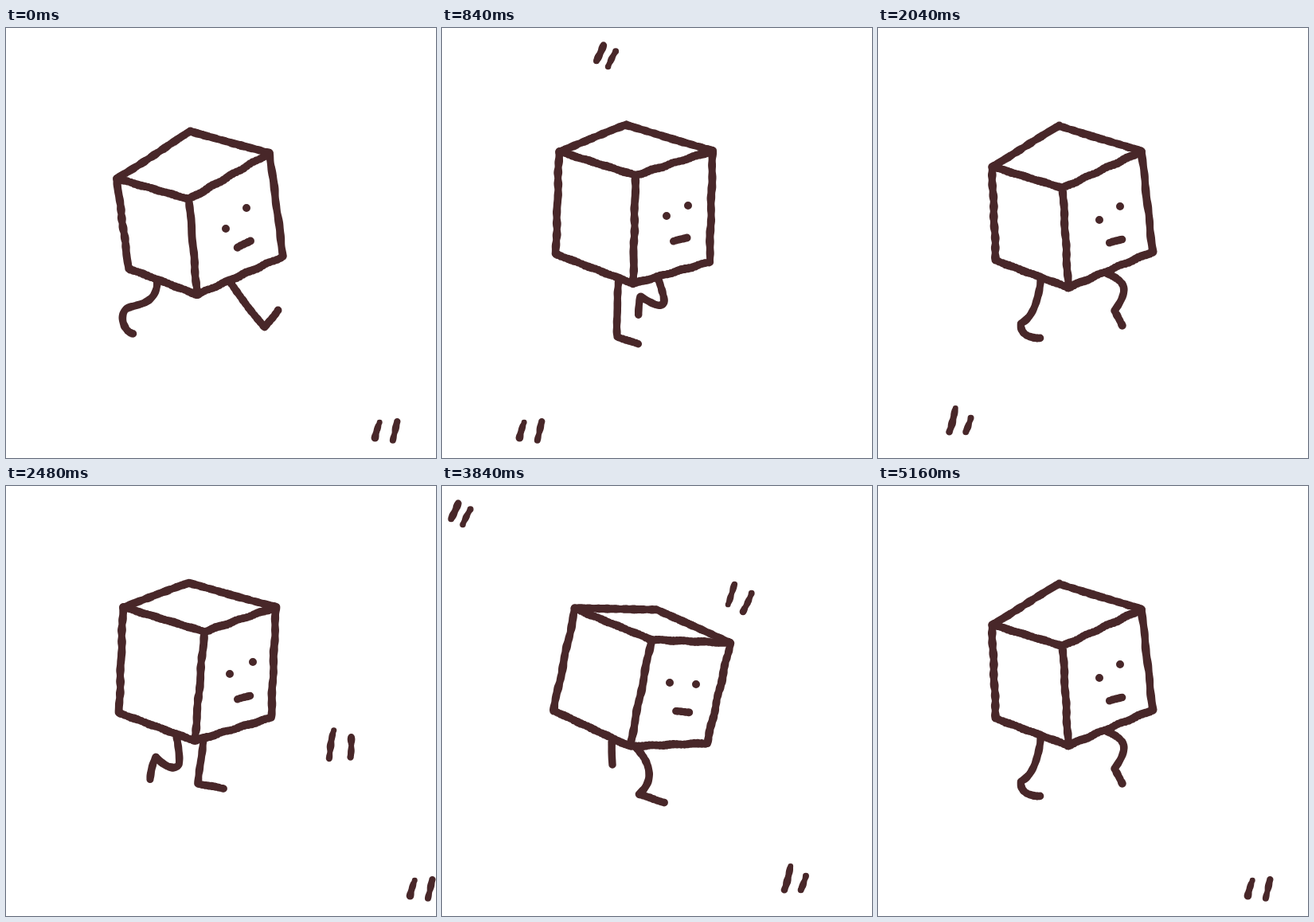
Write an HTML page with a canvas that moves like this. It is 540x540 px and loops after 5.2 s.

```html
<!DOCTYPE html>
<html lang="en">
<head>
<meta charset="utf-8">
<title>Walking cube</title>
<style>
html, body { margin: 0; width: 100%; height: 100%; overflow: hidden; background: #fff; }
canvas { display: block; width: 100vmin; height: 100vmin; }
</style>
</head>
<body>
<canvas width="540" height="540"></canvas>
<script>
const ctx = document.querySelector('canvas').getContext('2d');
const INK = '#482729', FRAME = 40, FRAMES = 130, CYCLE = 26;
const SPEED = 17.43, REPEAT = 64.53; // px per frame, frames between repeated marks

// Cube corners: back, left, front, right on top; then left, front, right below.
const poses = [
  { cube: [232,130, 139,189, 230,215, 331,157, 154,302, 240,335, 348,287],
    face: [276,252, 302,226, 291,276, 307,267],
    legs: ['M190 318C188 350 162 346 151 353C142 362 148 382 160 384', 'M281 318Q302 350 325 376L342 354'] },
  { cube: [230,127, 141,174, 238,201, 334,156, 147,295, 239,329, 341,290],
    face: [278,245, 305,224, 291,272, 307,265],
    legs: ['M204 318C207 340 198 348 182 346Q172 345 163 346Q160 360 167 376', 'M268 316C290 336 296 352 284 374L313 382'] },
  { cube: [230,122, 147,152, 249,183, 339,152, 142,285, 237,320, 333,291],
    face: [281,236, 310,221, 291,268, 307,263],
    legs: ['M214 314Q219 336 217 349C213 357 200 354 188 340Q183 352 181 369', 'M248 318L241 374L274 380'] },
  { cube: [262,147, 162,159, 260,197, 358,186, 142,282, 239,325, 338,313],
    face: [287,244, 319,244, 296,279, 313,280],
    legs: ['M214 320C209 336 198 339 186 341C183 352 190 361 200 362', 'M238 328Q262 358 286 392L301 373'] },
  { cube: [269,155, 167,154, 263,193, 362,197, 140,282, 236,327, 333,323],
    face: [286,247, 319,249, 294,283, 310,284],
    legs: ['M213 321L214 350', 'M243 328C262 348 268 368 247 387L280 398'] },
  { cube: [231,122, 147,155, 243,185, 340,154, 143,284, 240,321, 336,294],
    face: [282,236, 309,223, 291,268, 308,263],
    legs: ['M222 318Q219 350 220 388L247 397', 'M271 314C281 340 281 348 273 348Q268 349 249 337Q247 345 247 361'] },
  { cube: [228,123, 143,174, 232,201, 331,155, 148,292, 239,326, 345,281],
    face: [278,241, 304,224, 291,270, 307,265],
    legs: ['M204 317C201 350 192 364 179 371C178 382 188 391 204 389', 'M288 309C313 318 315 332 297 355L307 374'] }
];

// Each ground mark: its path, and the frames at which it stands there.
const marks = [
  ['M469 495L464 516M492 495L485 517', [0, REPEAT, 2 * REPEAT]],
  ['M202 21L194 42M218 29L209 50', [21, 21 + REPEAT]],
  ['M307 478L298 507M325 489L319 508', [39, 39 + REPEAT]],
  ['M412 307L405 342M434 316L432 340', [62]],
  ['M368 124L358 149M388 134L378 159', [96]]
];

// Turns a path into a slightly rough brush stroke.
function brush(d, width, rough = .45) {
  const shape = new Path2D();
  for (const part of d.match(/M[^M]+/g)) {
    const path = document.createElementNS('http://www.w3.org/2000/svg', 'path');
    path.setAttribute('d', part);
    const length = path.getTotalLength();
    for (let s = 0; s <= length; s += 1) {
      const { x, y } = path.getPointAtLength(s);
      const r = width / 2 + rough * (Math.sin(s * .43 + x) * .5 + Math.sin(s * .19 + y * .3) * .5);
      const shift = rough * Math.sin(s * .13 + x * .1);
      shape.moveTo(x + shift + r, y + shift);
      shape.arc(x + shift, y + shift, r, 0, 7);
    }
  }
  return shape;
}

function build({ cube, face, legs }) {
  const at = i => cube[2 * i] + ' ' + cube[2 * i + 1];
  const line = (...ids) => 'M' + ids.map(at).join('L');
  const eyes = new Path2D();
  for (const i of [0, 2]) {
    eyes.moveTo(face[i] + 5, face[i + 1]);
    eyes.arc(face[i], face[i + 1], 5, 0, 7);
  }
  return {
    body: new Path2D(line(0, 1, 4, 5, 6, 3) + 'Z'),
    legs: brush(legs.join(''), 9.6, .3),
    lines: [
      brush(line(0, 1, 4, 5, 6, 3, 0), 10),
      brush(line(1, 2, 3) + line(2, 5), 10),
      brush(`M${face[4]} ${face[5]}L${face[6]} ${face[7]}`, 9.6, .3),
      eyes
    ]
  };
}

const figures = poses.map(build);
const dashes = marks.map(([d, times]) => ({ shape: brush(d, 8.2, .8), times }));

function draw(now) {
  const frame = Math.floor(now / FRAME) % FRAMES;
  const figure = figures[Math.floor(frame % CYCLE * figures.length / CYCLE)];
  ctx.fillStyle = '#fff';
  ctx.fillRect(0, 0, 540, 540);
  ctx.fillStyle = INK;
  for (const { shape, times } of dashes) {
    for (const time of times) {
      ctx.save();
      ctx.translate(SPEED * (time - frame), 0);
      ctx.fill(shape);
      ctx.restore();
    }
  }
  ctx.fill(figure.legs);
  ctx.fillStyle = '#fff';
  ctx.fill(figure.body);
  ctx.fillStyle = INK;
  figure.lines.forEach(shape => ctx.fill(shape));
}

const start = performance.now();
function tick() {
  draw(performance.now() - start);
  requestAnimationFrame(tick);
}
tick();
</script>
</body>
</html>
```
